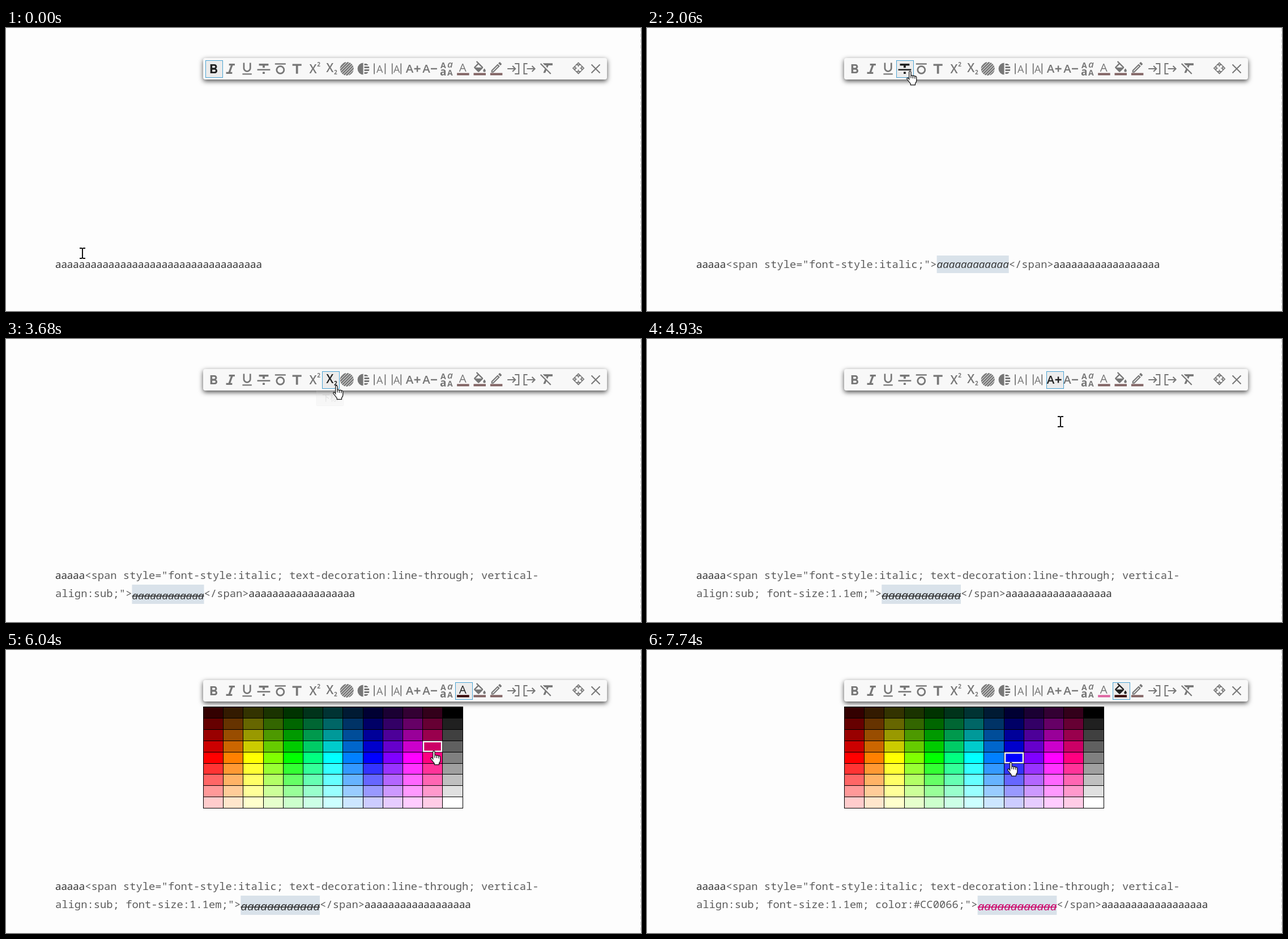
An HTML page with a canvas that plays this animation: 1121 px wide and 500 px high, repeating every 8 s.

```html
<!DOCTYPE html>
<html lang="zh">
<head>
<meta charset="utf-8">
<style>
html, body { margin: 0; width: 100%; height: 100%; overflow: hidden; background: #fdfdfd; }
canvas { display: block; }
</style>
</head>
<body>
<canvas id="stage" width="1121" height="500"></canvas>
<script>
const ctx = document.getElementById('stage').getContext('2d');
const LOOP = 8000, INK = '#222';
const SANS = '"Open Sans", "Noto Sans", sans-serif';
const TEXT = '18.75px ' + SANS, CODE = '18.82px "Noto Sans Mono", monospace';

// Moments when the formatted text gains another style
const ITALIC = 1520, STRIKE = 2260, SUB = 3550, BIGGER = 4720, COLOR = 6440;
const PALETTE = 5300;

// Highlighted toolbar button from a given time: [time, index]
const hovers = [[0, 0], [1160, 1], [1700, 2], [1850, 3], [3230, 7], [4470, 12], [PALETTE, 15], [6970, 16]];

// [label, button, appears, starts to fade]
const tips = [['斜体', 1, 1230, 1520], ['下标', 7, 3290, 3550], ['增大字号', 12, 4480, 4720], ['背景色', 16, 7050, 7330]];

// Cursor hot spot: [time, x, y]
const path = [
  [70, 135, 398], [140, 138, 422], [320, 138, 422], [630, 267, 425], [880, 267, 425],
  [1240, 399, 77], [1600, 399, 77], [2000, 464, 76], [2330, 464, 76], [2640, 440, 220],
  [3010, 530, 108], [3060, 530, 108], [3290, 583, 82], [3700, 583, 82], [3980, 610, 190],
  [4310, 700, 108], [4360, 700, 108], [4530, 722, 80], [4780, 722, 80], [4930, 730, 146],
  [5090, 745, 165], [5400, 821, 83], [5540, 821, 83], [5620, 827, 96], [6040, 755, 178],
  [6620, 755, 178], [6760, 753, 212], [7080, 838, 80], [7310, 838, 80], [7580, 690, 215], [7740, 642, 198]
];

const clamp = v => Math.max(0, Math.min(1, v));
const buttonX = i => 367.4 + 29.35 * i;
const latest = (list, t) => list.filter(e => e[0] <= t).pop();

function cursorAt(t) {
  const next = path.findIndex(k => k[0] > t);
  if (next < 1) return path[next < 0 ? path.length - 1 : 0].slice(1);
  const [a, b] = [path[next - 1], path[next]];
  const u = (t - a[0]) / (b[0] - a[0]), e = u * u * (3 - 2 * u);
  return [a[1] + (b[1] - a[1]) * e, a[2] + (b[2] - a[2]) * e];
}

function write(text, x, y, font, color = INK, align = 'left') {
  ctx.font = font;
  ctx.fillStyle = color;
  ctx.textAlign = align;
  ctx.fillText(text, x, y);
  return x + ctx.measureText(text).width;
}

function box(x, y, w, h, color) {
  ctx.fillStyle = color;
  ctx.fillRect(x, y, w, h);
}

function outline(x, y, w, h, width, color) {
  ctx.lineWidth = width;
  ctx.strokeStyle = color;
  ctx.strokeRect(x, y, w, h);
}

function stroke(d, width = 2, color = INK) {
  ctx.lineWidth = width;
  ctx.strokeStyle = color;
  ctx.stroke(new Path2D(d));
}

// Fills a path whose own centre is (mx, my) around the current origin
function shape(d, mx, my, scale = 1.2, y = 0) {
  ctx.save();
  ctx.translate(0, y);
  ctx.scale(scale, scale);
  ctx.translate(-mx, -my);
  ctx.fillStyle = INK;
  ctx.fill(new Path2D(d), 'evenodd');
  ctx.restore();
}

function disc(r, draw) {
  ctx.save();
  ctx.beginPath();
  ctx.arc(0, 0, r, 0, 7);
  ctx.clip();
  draw();
  ctx.restore();
}

const glyph = (s, x, y, size, style = '600') => write(s, x, y, `${style} ${size}px ${SANS}`, INK, 'center');
const bar = color => box(-11, 7.5, 21.5, 4, color);

// Each icon is drawn around (0, 0)
const icons = [
  () => shape('M15.6 10.79c.97-.67 1.65-1.77 1.65-2.79 0-2.26-1.75-4-4-4H7v14h7.04c2.09 0 3.71-1.7 3.71-3.79 0-1.52-.86-2.82-2.15-3.42zM10 6.5h3c.83 0 1.5.67 1.5 1.5s-.67 1.5-1.5 1.5h-3zM13.5 15.5H10v-3h3.5c.83 0 1.5.67 1.5 1.5s-.67 1.5-1.5 1.5z', 12.4, 11, 1.15),
  () => shape('M10 4v2.6h2.4l-3.2 8.8H6V18h8.4v-2.6H12l3.2-8.8H18V4z', 12, 11, 1.28),
  () => shape('M12 17c3.31 0 6-2.69 6-6V3h-2.3v8c0 2-1.6 3.7-3.7 3.7S8.3 13 8.3 11V3H6v8c0 3.31 2.69 6 6 6zM5 19v2h14v-2z', 12, 12, 1.17),
  () => shape('M10.4 19h3.2v-3h-3.2zM5 4v3h5.4v3h3.2V7H19V4zM2.5 14h19v-2h-19z', 12, 11.5),
  () => { stroke('M-9.5-8.5h19', 2.4); stroke('M-6.5 2a6.5 6.3 0 1 0 13 0a6.5 6.3 0 1 0-13 0', 2.8); },
  () => shape('M5 4v3h5.4v12h3.2V7H19V4z', 12, 11.5, 1.15),
  () => { glyph('X', -1, 8, 21); glyph('2', 9, -4, 10, '700'); },
  () => { glyph('X', -.5, 6, 21); glyph('2', 9.5, 10, 10, '700'); },
  () => disc(12, () => { for (let k = -24; k <= 24; k += 5) stroke(`M${k - 12} 12L${k + 12}-12`, 2.7); }),
  () => disc(10.5, () => {
    box(-11, -11, 10.5, 22, INK);
    for (let y = -9; y < 11; y += 5) box(1.5, y, 10, 3, INK);
  }),
  () => { stroke('M-10.3-9.5v19M9-9.5v19', 1.8); glyph('A', -.6, 6.5, 18, '400'); },
  () => { stroke('M-8-9.5v19M7.5-9.5v19', 1.8); glyph('A', 0, 6.5, 18, '400'); },
  () => { glyph('A', -6.5, 7, 20.5); stroke('M1.5 0h11M7-5.5v11', 2.4); },
  () => { glyph('A', -6.5, 7, 20.5); stroke('M1.5 0h11', 2.4); },
  () => {
    glyph('A', -6, -1.5, 14, '700');
    glyph('a', 6, -2, 17, 'italic 600');
    glyph('a', -6, 12, 19, '700');
    glyph('A', 6, 11.5, 14, '700');
  },
  t => { glyph('A', -.8, 4.5, 20.5, '500'); bar(t >= COLOR ? '#cc0066' : '#300'); },
  () => {
    shape('M16.56 8.94L7.62 0 6.21 1.41l2.38 2.38-5.15 5.15c-.59.59-.59 1.54 0 2.12l5.5 5.5c.6.6 1.5.6 2.12 0l5.5-5.5c.59-.58.59-1.53 0-2.12zM5.21 10L10 5.21 14.79 10zM19 11.5s-2 2.17-2 3.5c0 1.1.9 2 2 2s2-.9 2-2c0-1.33-2-3.5-2-3.5z', 12, 8.5, 1.15, -4);
    bar('#300');
  },
  () => {
    shape('M14.06 9.02l.92.92L5.92 19H5v-.92zM17.66 3c-.25 0-.51.1-.7.29l-1.83 1.83 3.75 3.75 1.83-1.83c.39-.39.39-1.02 0-1.41l-2.34-2.34c-.2-.2-.45-.29-.71-.29zM14.06 6.19L3 17.25V21h3.75L17.81 9.94z', 12, 12, 1.02, -2.5);
    bar('#300');
  },
  () => stroke('M-10 0H4M-1-5l5 5-5 5M3-9h7V9H3', 2.1),
  () => stroke('M-4-9h-6V9h6M-5 0H9M4-5l5 5-5 5', 2.1),
  () => shape('M3.27 5L2 6.27l6.97 6.97L6.5 19h3l1.57-3.66L16.73 21 18 19.73zM6 5v.18L8.82 8h2.4l-.72 1.68 2.1 2.1L14.21 8H20V5z', 11, 13, 1.22)
];

function drawToolbar(t) {
  ctx.save();
  ctx.shadowColor = 'rgba(0,0,0,.7)';
  ctx.shadowBlur = 9;
  ctx.shadowOffsetY = 3;
  ctx.fillStyle = '#f8f8f8';
  ctx.beginPath();
  ctx.roundRect(348, 53, 713, 38, 4);
  ctx.fill();
  ctx.restore();

  const active = latest(hovers, t)[1];
  const left = Math.round(buttonX(active) - 15);
  box(left, 57, 31, 31, '#4ba3d3');
  box(left + 1, 58, 29, 29, '#ececec');
  const place = (x, y, alpha, draw) => {
    ctx.save();
    ctx.globalAlpha = alpha;
    ctx.translate(x, y);
    draw(t);
    ctx.restore();
  };
  icons.forEach((draw, i) => place(buttonX(i) - .5, 72, i === active ? 1 : .6, draw));
  place(1010.5, 71, .6, () => {
    for (let k = 0; k < 4; k++) {
      stroke('M0-2.5V-6M-3.8-5.8L0-9.6L3.8-5.8Z', 1.7);
      ctx.rotate(Math.PI / 2);
    }
  });
  place(1041, 72, .6, () => stroke('M-7.5-7.5l15 15M7.5-7.5l-15 15', 2));
}

function drawPalette(mx, my) {
  const w = 35.2, h = 19.9;
  box(348, 100, 459, 180, '#000');
  const col = Math.floor((mx - 348) / w), row = Math.floor((my - 100) / h);
  for (let c = 0; c < 13; c++) for (let r = 0; r < 9; r++) {
    const g = Math.min(255, r * 32);
    const x = Math.round(348 + c * w), y = Math.round(100 + r * h);
    const cw = Math.round(348 + (c + 1) * w) - x - 1, ch = Math.round(100 + (r + 1) * h) - y - 1;
    box(x + 1, y + 1, cw, ch, c < 12 ? `hsl(${c * 30} 100% ${(r + 1) * 10}%)` : `rgb(${g},${g},${g})`);
    if (c === col && r === row) outline(x + 2, y + 2, cw - 2, ch - 2, 2.4, '#fff');
  }
}

function drawText(t, mx) {
  const code = (s, x, y) => write(s, x, y, CODE, '#5c5c5c');
  const plain = (n, x, y) => write('a'.repeat(n), x, y, TEXT, '#303030');
  let y = 424, x = plain(5, 87, y);
  if (t < ITALIC) {
    const step = ctx.measureText('a').width;
    const count = t < 320 ? 0 : Math.round(12 * clamp((mx - x) / (12 * step)));
    box(x, 402, count * step, 29, '#d9e2ea');
    plain(30, x, y);
    return;
  }
  x = code('<span style="font-style:italic;', x, y);
  let rest = '">';
  if (t >= STRIKE) {
    code(t < SUB ? ' text-decoration:line-' : ' text-decoration:line-through; vertical-', x, y);
    rest = (t < SUB ? 'through;' : 'align:sub;') + (t < BIGGER ? '' : ' font-size:1.1em;') +
      (t < COLOR ? '' : ' color:#CC0066;') + rest;
    x = 87;
    y += 32;
  }
  x = code(rest, x, y);
  const size = 18.75 * (t < BIGGER ? 1 : 1.1), base = y + (t < SUB ? 0 : 4);
  const color = t < COLOR ? '#303030' : '#cc0066', word = 'a'.repeat(12);
  ctx.font = `italic ${size}px ${SANS}`;
  const width = ctx.measureText(word).width;
  box(x, y - 22, width, t < SUB ? 31 : 34, '#d9e2ea');
  write(word, x, base, ctx.font, color);
  if (t >= STRIKE) box(x, base - 6.5, width, 1.5, color);
  plain(18, code('</span>', x + width, y), y);
}

function drawTips(t) {
  for (const [label, button, start, end] of tips) {
    const alpha = clamp((t - start) / 120) * clamp(1 - (t - end) / 150);
    if (!alpha) continue;
    const w = 20 + 14 * label.length, x = Math.round(buttonX(button) - w / 2 - .5);
    ctx.save();
    ctx.globalAlpha = alpha;
    ctx.shadowColor = 'rgba(0,0,0,.2)';
    ctx.shadowBlur = 3;
    box(x, 90, w, 28, '#f1f1f1');
    ctx.shadowColor = 'transparent';
    outline(x + .5, 90.5, w - 1, 27, 1, '#c4c4c4');
    write(label, x + w / 2, 108.5, '14px "Noto Sans CJK SC", "Noto Sans CJK", sans-serif', '#555', 'center');
    ctx.restore();
  }
}

const HAND = 'M4.5 14V2a1.6 1.6 0 0 1 3.2 0V8.5q.3-1.5 1.7-1.2t1.6 1.6q.4-1.3 1.7-1t1.6 1.6q.5-1.1 1.7-.6t1.1 2V16q0 3-2.2 5v2.6H7V21.5Q5 19 1.2 14.2Q.3 12.3 1.7 11.7Q3.2 11.4 4.5 14Z';

function drawCursor(t, x, y) {
  const onBar = y < 97 && y > 53;
  const onPalette = t >= PALETTE && x < 806 && y >= 97 && y < 280;
  ctx.save();
  if (onBar || onPalette) {
    ctx.translate(x - 6, y);
    ctx.scale(1.04, 1.04);
    ctx.fillStyle = '#fff';
    ctx.fill(new Path2D(HAND));
    stroke(HAND + 'M7.7 8.5V12M11 9V12.5M14.3 9.8V13', 1.2, '#111');
  } else {
    ctx.translate(Math.round(x), Math.round(y));
    stroke('M-5-9H-1.5L0-8L1.5-9H5M0-9V9M-5 9H-1.5L0 8L1.5 9H5', 2, '#111');
  }
  ctx.restore();
}

function frame(now) {
  const t = now % LOOP, [mx, my] = cursorAt(t);
  box(0, 0, 1121, 500, '#fdfdfd');
  ctx.setLineDash([6, 4]);
  stroke('M1120.5 0V500', 1, '#d4d4d4');
  ctx.setLineDash([]);
  drawToolbar(t);
  drawText(t, mx);
  if (t >= PALETTE) drawPalette(mx, my);
  drawTips(t);
  drawCursor(t, mx, my);
  requestAnimationFrame(frame);
}
requestAnimationFrame(frame);
</script>
</body>
</html>
```
